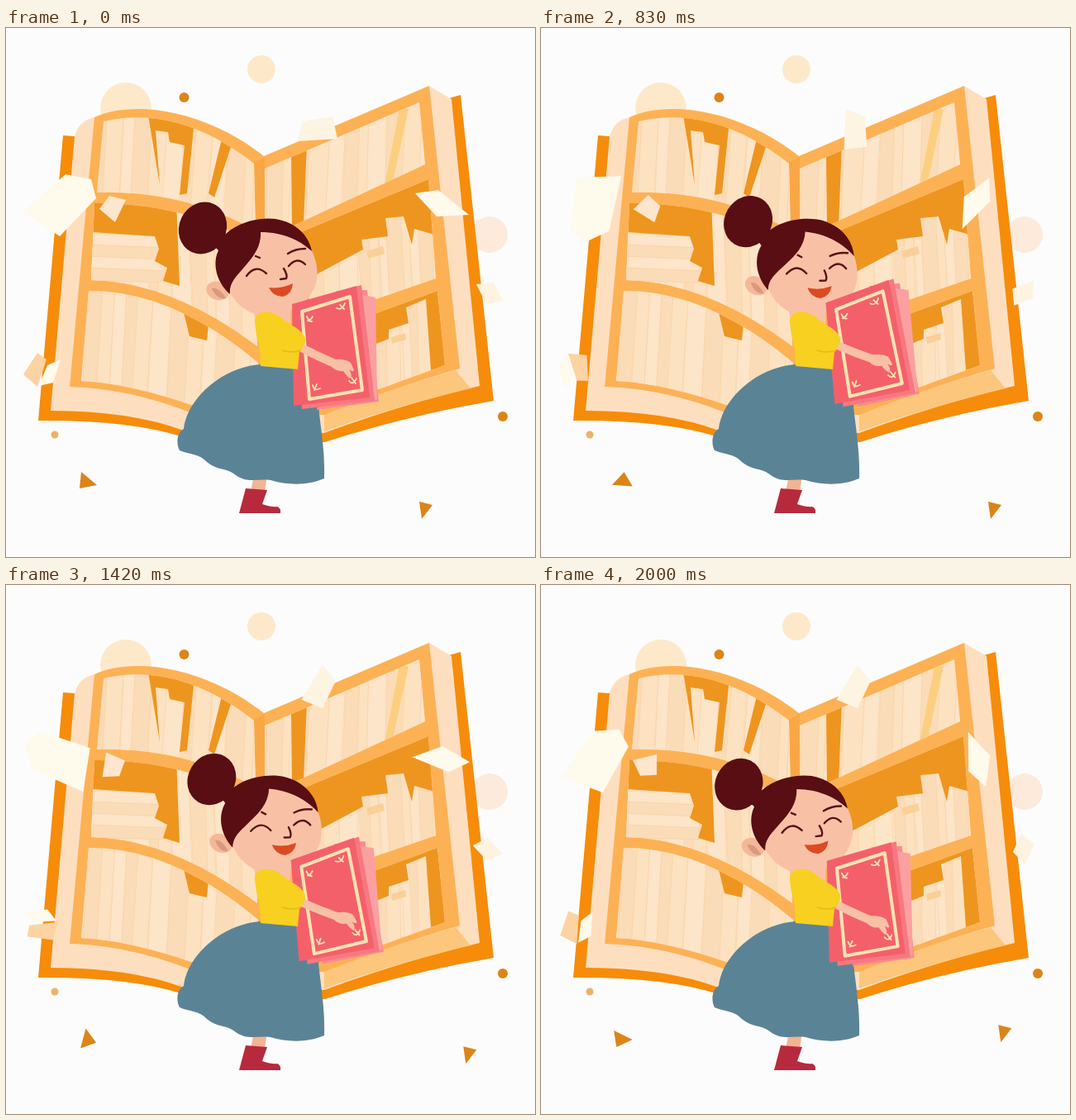
An HTML page for the animation above (2080 ms loop, 640 by 640 pixels).

```html
<!DOCTYPE html>
<html lang="en">
<head>
<meta charset="utf-8">
<title>Hugging a book</title>
<style>
html, body { margin: 0; width: 100%; height: 100%; overflow: hidden; background: #fcfcfc; }
svg { display: block; width: 100vw; height: 100vh; }
.line { fill: none; stroke: #5a1314; stroke-width: 2.4; stroke-linecap: round; stroke-linejoin: round; }
.skin { fill: #f8c1a6; }
.hair { fill: #580e12; }
.cream { fill: none; stroke: #fde3b4; stroke-linejoin: round; stroke-linecap: round; }
</style>
</head>
<body>
<svg viewBox="0 0 640 640">
  <g fill="#fde9ca">
    <circle cx="309" cy="50" r="17"/>
    <circle cx="145" cy="97" r="31"/>
    <circle cx="585" cy="250" r="22" fill="#fdeadb"/>
  </g>
  <g fill="#dc8418">
    <circle cx="215.500" cy="84" r="6"/>
    <circle cx="601" cy="470" r="6"/>
    <circle cx="59" cy="492" r="4.500" fill="#eeb268"/>
  </g>

  <!-- open book with shelves -->
  <path fill="#f68c0a" d="M69 130L39 475Q150 474 215 495L386 501Q480 470 590 451L550 81L536 85L312 160L83 131Z"/>
  <path fill="#fddfc0" d="M83 131Q88 112 107 108L312 160L512 70L539 86L573 433Q480 455 385 490L215 487Q150 463 54 463Z"/>
  <path fill="#fcc67c" d="M544 414L562 436Q470 458 385 488L385 462Z"/>
  <path fill="#fdb155" d="M107 108C150 88 235 95 312 155L512 70L549 412Q460 438 385 468L225 466Q150 436 77 434Z"/>
  <path fill="#f9a745" d="M300 163L313 156L313 260L302 255Z"/>
  <g id="shelves"></g>

  <!-- girl -->
  <path fill="#f3b493" d="M300 540L316 540L313 562L296 562Z"/>
  <path fill="#b72a3e" d="M290 557L316 559L310 576Q322 580 328 579Q333 581 332 587L282 587Z"/>
  <path fill="#5b8396" d="M308 407C262 410 219 448 215 485C206 490 206 504 210 511C222 516 234 515 243 525C256 536 266 531 278 541C292 551 304 545 320 547C340 553 364 554 385 545C386 510 380 480 378 456L354 411Z"/>
  <path class="skin" d="M296 325L345 330L344 360L303 358Z"/>
  <g id="head">
    <ellipse cx="256" cy="318" rx="14" ry="11" fill="#f6b799" transform="rotate(20 256 318)"/>
    <path fill="#d99a7c" d="M249 315Q258 313 266 327Q255 329 249 315Z"/>
    <path class="skin" d="M265 265C285 232 350 232 366 262C374 275 378 290 376 304C372 328 350 345 322 348C298 350 280 338 270 318Z"/>
    <ellipse class="hair" cx="238" cy="242" rx="28.500" ry="32" transform="rotate(25 238 242)"/>
    <path class="hair" d="M271 322C255 308 249 286 257 269L250 262L272 244C290 232 312 229 326 231C350 235 366 250 370 270C350 252 328 247 308 247C309 266 298 278 285 293C274 305 270 312 271 322Z"/>
    <path class="line" d="M302 276L307 278M341 273Q350 267 362 267M291 300Q302 285 315 297M342 288Q352 276 362 286M336 291Q341 299 339 303L332 304"/>
    <path fill="#dc4a22" d="M318 314Q333 316 347 309Q346 322 335 325Q323 325 318 314Z"/>
  </g>
  <g id="hug">
    <path fill="#f98a90" d="M400 318L437 317L451 452L376 462Z"/>
    <path fill="#fba0a0" d="M428 322L447 326L449 449L438 452Z"/>
    <path fill="#f77880" d="M352 334L430 311L446 451L358 461Z"/>
    <path fill="#f4606a" d="M346 334L424 312L440 447L348 457Z"/>
    <path class="cream" stroke-width="4" d="M358 343L416 325L431 438L367 449Z"/>
    <path class="cream" stroke-width="1.800" d="M364 349Q367 357 371 349M365 354L370 355M400 339Q407 342 410 333M404 335L409 340M371 432Q373 440 380 436M373 438L376 431M415 427Q420 433 424 424M418 423L423 430"/>
    <path d="M354 385Q376 397 405 409" fill="none" stroke="#f8c1a6" stroke-width="10"/>
    <path class="skin" d="M398 401Q410 400 417 405L421 414Q420 417 415 413Q420 421 416 424Q411 420 408 415Q400 416 394 410Z"/>
  </g>
  <path fill="#f8d020" d="M301 356C300 344 314 340 328 347L346 360C357 365 364 374 362 380C359 387 357 390 355 392L353 413L308 409Q308 385 303 372Z"/>
  <path d="M334 390Q345 394 357 390" fill="none" stroke="#e5b81c" stroke-width="1.500"/>
  <g id="bits"></g>
</svg>
<script>
const $ = id => document.getElementById(id);

function add(parent, tag, attrs) {
  const el = document.createElementNS('http://www.w3.org/2000/svg', tag);
  for (const k in attrs) el.setAttribute(k, attrs[k]);
  return parent.appendChild(el);
}

let seed = 7;
const rand = (lo, hi) => {
  seed = seed * 16807 % 2147483647;
  return lo + (hi - lo) * seed / 2147483647;
};

// Each cell is packed with leaning books; gap is the dark back that stays visible
const cells = [
  { d: 'M118 113Q208 92 300 164L302 245Q215 196 110 199Z', lean: -8,
    gap: 'M172 105L228 112L219 200L210 202L216 142L198 138L196 126L181 124L186 190ZM262 130L275 135L252 205L245 200Z' },
  { d: 'M107 212Q215 211 302 262L304 385Q200 307 103 305Z', lean: 6, stack: true,
    gap: 'M103 205L206 207L210 312L190 306L195 290L180 282L185 267L180 252L105 247Z' },
  { d: 'M100 318Q200 317 305 405L300 470L230 458Q150 430 91 427Z', lean: -8,
    gap: 'M214 340L245 358L243 378L222 373Z' },
  { d: 'M313 170L500 90L507 165L352 237L313 255Z', lean: -7,
    gap: 'M345 148L364 140L360 238L346 244Z', gold: 'M476 98L487 98L466 195L457 195Z' },
  { d: 'M352 249L511 183L520 303L372 354Z', lean: 7,
    gap: 'M350 245L515 178L519 250L494 243L491 262L481 228L459 230L462 252L430 256L432 268L372 300Z' },
  { d: 'M440 348L522 318L531 408L440 441Z', lean: 5,
    gap: 'M436 345L522 316L532 410L514 414L508 328L484 338L487 357L463 365L463 376L448 382Z' }
];
const pale = ['#fce5c8', '#fbdcb8', '#fce2c0'];

cells.forEach(({ d, lean, gap, gold, stack }, n) => {
  const clip = add(add($('shelves'), 'clipPath', { id: 'cell' + n }), 'path', { d });
  const g = add($('shelves'), 'g', { 'clip-path': `url(#cell${n})` });
  const box = clip.getBBox(), end = box.y + box.height;
  add(g, 'path', { d, fill: pale[0] });
  for (let x = box.x - 10, i = 0; x < box.x + box.width + 10; i++) {
    const w = rand(9, 24), tilt = lean + rand(-3, 3);
    add(g, 'path', { d: `M${x} ${box.y}h${w}L${x + w + tilt} ${end}h${-w}Z`, fill: pale[i % 3], stroke: '#fbd4a8', 'stroke-width': .8 });
    x += w;
  }
  if (stack) {
    for (let i = 0; i < 4; i++)
      add(g, 'path', { d: `M100 ${248 + i * 14}l92 4v14l-92 -3Z`, fill: pale[i % 2], stroke: '#fbd4a8' });
  }
  add(g, 'path', { d: gap, fill: '#ee951f' });
  if (gold) add(g, 'path', { d: gold, fill: '#fccf80' });
});
add($('shelves'), 'path', { d: 'M436 270l20 -6l2 9l-20 6zM466 374l17 -5l1 8l-17 5z', fill: '#fbcf98' });

// Loose pieces: outline around a centre, turning by a fixed angle each step
const STEPS = 25, LOOP = 2080, STEP = 1000 / 12, TURN = 13;
const fast = 360 / STEPS, slow = 240 / STEPS;
const pieces = [
  { x: 66, y: 213, spin: fast, fill: '#fefaec', shape: '6,-36 37,-30 43,-7 -1,39 -45,9' },
  { x: 129, y: 218, spin: slow, fill: '#fde6cd', shape: '-4,-15 16,-10 3,17 -16,1' },
  { x: 378, y: 125, spin: slow, stop: TURN, fill: '#fdf4e2', shape: '-19,-12 17,-18 23,9 -26,12' },
  { x: 527, y: 212, spin: slow, fill: '#fefaec', shape: '-32,-12 -4,-16 33,14 -6,16' },
  { x: 584, y: 320, spin: slow, fill: '#fdf3e0', shape: '-15,-10 6,-12 17,10 -3,14' },
  { x: 42, y: 413, spin: fast, fill: '#fefaec', shape: '8,-5 24,-12 15,16 -2,20' },
  { x: 42, y: 413, spin: fast, fill: '#fcd3a2', shape: '-4,-20 7,-12 -4,21 -21,6' },
  { x: 98, y: 549, spin: fast, fill: '#dc8418', shape: '-7,-12 12,4 -9,8' },
  { x: 508, y: 582, spin: 0, fill: '#dc8418', shape: '-8,-9 8,-5 -5,12',
    drift: n => [4.1 * Math.min(n, TURN), -3.7 * Math.max(0, n - TURN)] }
];
for (const p of pieces) p.el = add($('bits'), 'polygon', { points: p.shape, fill: p.fill });

function draw(ms) {
  const n = Math.min(STEPS - 1, Math.floor((ms % LOOP + 3.4) / STEP));
  const sway = n < TURN ? n / TURN : (STEPS - n) / (STEPS - TURN);
  $('head').setAttribute('transform', `rotate(${8 * sway} 318 355)`);
  $('hug').setAttribute('transform', `rotate(${-5.5 * sway} 325 355)`);
  for (const { el, x, y, spin, stop = STEPS, drift } of pieces) {
    const [dx, dy] = drift ? drift(n) : [0, 0];
    el.setAttribute('transform', `translate(${x + dx} ${y + dy}) rotate(${spin * Math.min(n, stop)})`);
  }
}

const start = performance.now();
function tick() {
  draw(performance.now() - start);
  requestAnimationFrame(tick);
}
tick();
</script>
</body>
</html>
```
